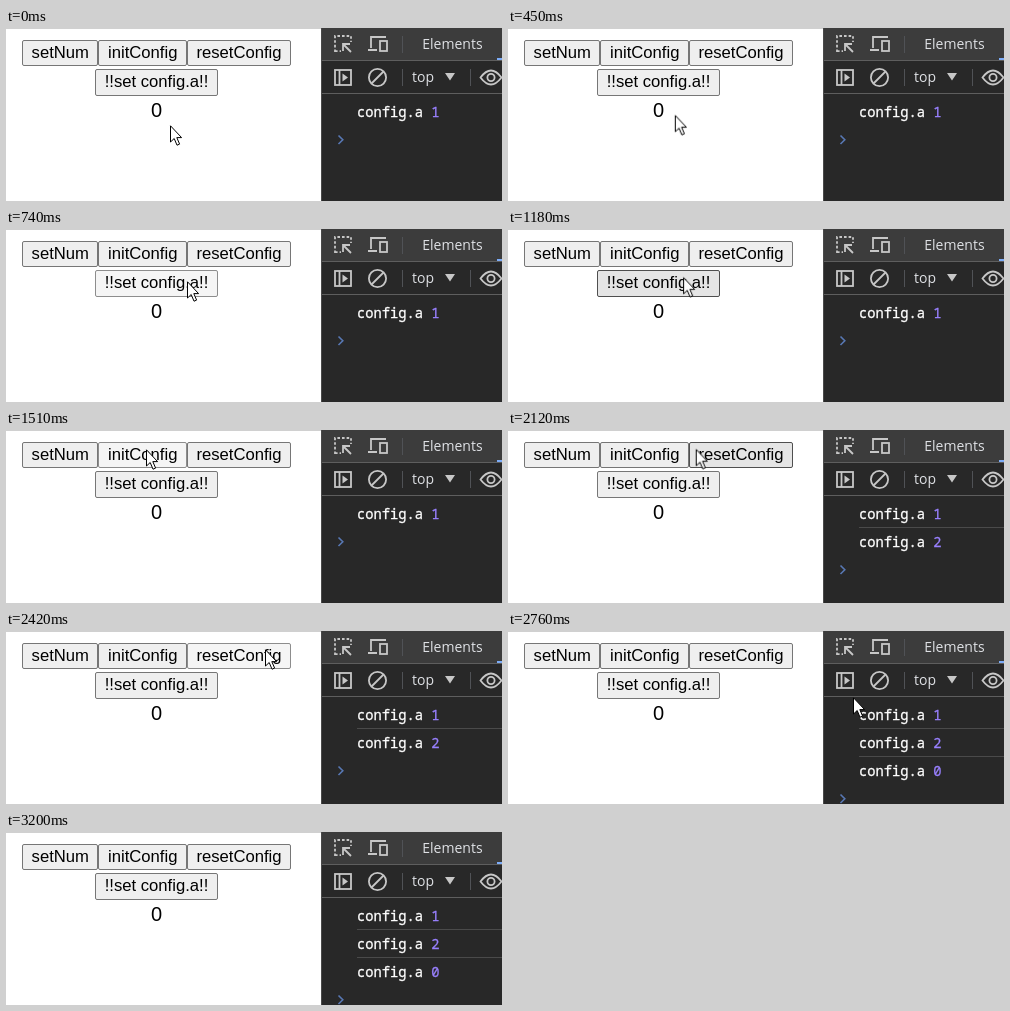
An HTML page for the animation above (3.45 s loop, 496x173 px).

```html
<!DOCTYPE html>
<html lang="en">
<head>
<meta charset="utf-8">
<title>Config buttons and console</title>
<style>
html, body { margin: 0; width: 100%; height: 100%; overflow: hidden; background: #fff; }
svg { display: block; width: 496px; height: 173px; }

.btn rect { fill: #efefef; stroke: #767676; }
.btn text { font: 16.67px "Liberation Sans", Arial, sans-serif; text-anchor: middle; }
.num { font: 20px "Liberation Sans", Arial, sans-serif; text-anchor: middle; }
.ui { font: 14px "Open Sans", "Noto Sans", sans-serif; fill: #dfe1e5; }
.log { font: 13.75px "Noto Sans Mono", "DejaVu Sans Mono", monospace; fill: #fff; stroke: #fff; stroke-width: .3; white-space: pre; }
.log tspan { fill: #9980ff; stroke: #9980ff; }
.icon { fill: none; stroke: #c7c7c7; stroke-width: 1.8; }
.solid { fill: #c7c7c7; }

.anim { animation: 3450ms step-end infinite; }
#set { animation-name: set; }
#init { animation-name: init; }
#reset { animation-name: reset; }
#row2 { animation-name: row2; }
#row3 { animation-name: row3; }
#prompt { animation-name: prompt; }
#cursor { animation-name: move; }

/* idle, hover, pressed, hover, idle */
@keyframes set {
  0%, 36.8% { fill: #efefef; stroke: #767676; }
  17.8%, 25.21% { fill: #e5e5e5; stroke: #4f4f4f; }
  21.44% { fill: #f5f5f5; stroke: #8d8d8d; }
}
@keyframes init {
  0%, 60.3% { fill: #efefef; stroke: #767676; }
  38%, 48.98% { fill: #e5e5e5; stroke: #4f4f4f; }
  43.76% { fill: #f5f5f5; stroke: #8d8d8d; }
}
@keyframes reset {
  0%, 77% { fill: #efefef; stroke: #767676; }
  60.3%, 73.91% { fill: #e5e5e5; stroke: #4f4f4f; }
  70.14% { fill: #f5f5f5; stroke: #8d8d8d; }
}
@keyframes row2 { 0% { opacity: 0; } 48.98%, 100% { opacity: 1; } }
@keyframes row3 { 0% { opacity: 0; } 73.91%, 100% { opacity: 1; } }
@keyframes prompt {
  0% { transform: translateY(0); }
  48.98% { transform: translateY(28px); }
  73.91%, 100% { transform: translateY(56px); }
}
@keyframes move {
  0% { transform: translate(164px, 97px); }
  1.73% { transform: translate(164px, 95px); }
  3.47% { transform: translate(164px, 93px); }
  11.59% { transform: translate(165px, 91px); animation-timing-function: steps(9); }
  21.44% { transform: translate(181px, 52px); }
  32.46% { transform: translate(179px, 51px); animation-timing-function: steps(10); }
  43.76% { transform: translate(140px, 19px); }
  55.36% { transform: translate(147px, 19px); animation-timing-function: steps(11); }
  70.14% { transform: translate(259px, 18px); }
  75.07% { transform: translate(266px, 22px); animation-timing-function: steps(5); }
  79.99% { transform: translate(345px, 66px); animation-timing-function: steps(9); }
  88.4% { transform: translate(450px, 164px); }
  92.75%, 100% { transform: translate(450px, 200px); }
}
</style>
</head>
<body>
<svg viewBox="0 0 496 173">
  <!-- page -->
  <rect width="496" height="173" fill="#fff"/>
  <rect width="315" height="1" fill="#d0d0d0"/>
  <g class="btn">
    <rect x="16.5" y="12.5" width="75" height="25" rx="1.5"/>
    <rect id="init" class="anim" x="92.5" y="12.5" width="88" height="25" rx="1.5"/>
    <rect id="reset" class="anim" x="181.5" y="12.5" width="103" height="25" rx="1.5"/>
    <rect id="set" class="anim" x="89.5" y="41.5" width="122" height="26" rx="1.5"/>
    <text x="54.3" y="30">setNum</text>
    <text x="136.7" y="30">initConfig</text>
    <text x="233" y="30">resetConfig</text>
    <text x="150.5" y="59">!!set config.a!!</text>
  </g>
  <text class="num" x="150.5" y="89">0</text>

  <!-- developer tools -->
  <rect x="315" width="181" height="173" fill="#282828"/>
  <rect x="315" width="1" height="173" fill="#4a4a4a"/>
  <rect x="316" width="180" height="32" fill="#3c3c3c"/>
  <path d="M316 32.5H496M316 65.5H496" stroke="#5e5e5e"/>
  <path d="M396.5 8V25M396.5 41V58M464.5 41V58" stroke="#505256"/>
  <rect x="491" y="30" width="5" height="2" fill="#7cacf8"/>

  <g class="icon">
    <path d="M329 24V8H345V14M329 23.2H335" stroke-dasharray="2.6 2"/>
    <path d="M345 24L338 17M337 23V16H344"/>
    <path d="M365 20V9H380M362 22H371"/>
    <rect x="374" y="13" width="7" height="10"/>
    <rect x="329" y="42" width="16" height="15"/>
    <path d="M333.5 42V57"/>
    <circle cx="371.5" cy="49.5" r="8.6"/>
    <path d="M365.5 55.5L377.5 43.5"/>
    <path d="M474.5 49.5Q485 35.5 495.5 49.5Q485 63.5 474.5 49.5Z"/>
    <circle cx="485" cy="49.5" r="3.6"/>
  </g>
  <path class="solid" d="M336.5 45.5L342 49.5L336.5 53.5ZM439 45H449L444 52.5Z"/>
  <text class="ui" x="416.3" y="21">Elements</text>
  <text class="ui" x="406" y="54">top</text>

  <text class="log" x="351" y="89">config.a <tspan>1</tspan></text>
  <g id="row2" class="anim">
    <path d="M351 97.5H496" stroke="#4a4a4a"/>
    <text class="log" x="351" y="117">config.a <tspan>2</tspan></text>
  </g>
  <g id="row3" class="anim">
    <path d="M351 125.5H496" stroke="#4a4a4a"/>
    <text class="log" x="351" y="145">config.a <tspan>0</tspan></text>
  </g>
  <path id="prompt" class="anim" d="M332.5 107.5L336.8 111.8L332.5 116" fill="none" stroke="#5878b4" stroke-width="1.6"/>

  <path id="cursor" class="anim" d="M.5 .8V17L4.2 13.5L7 20.2L9.6 19.1L6.8 12.6H11.6Z" fill="#fff" stroke="#000"/>
</svg>
</body>
</html>
```
